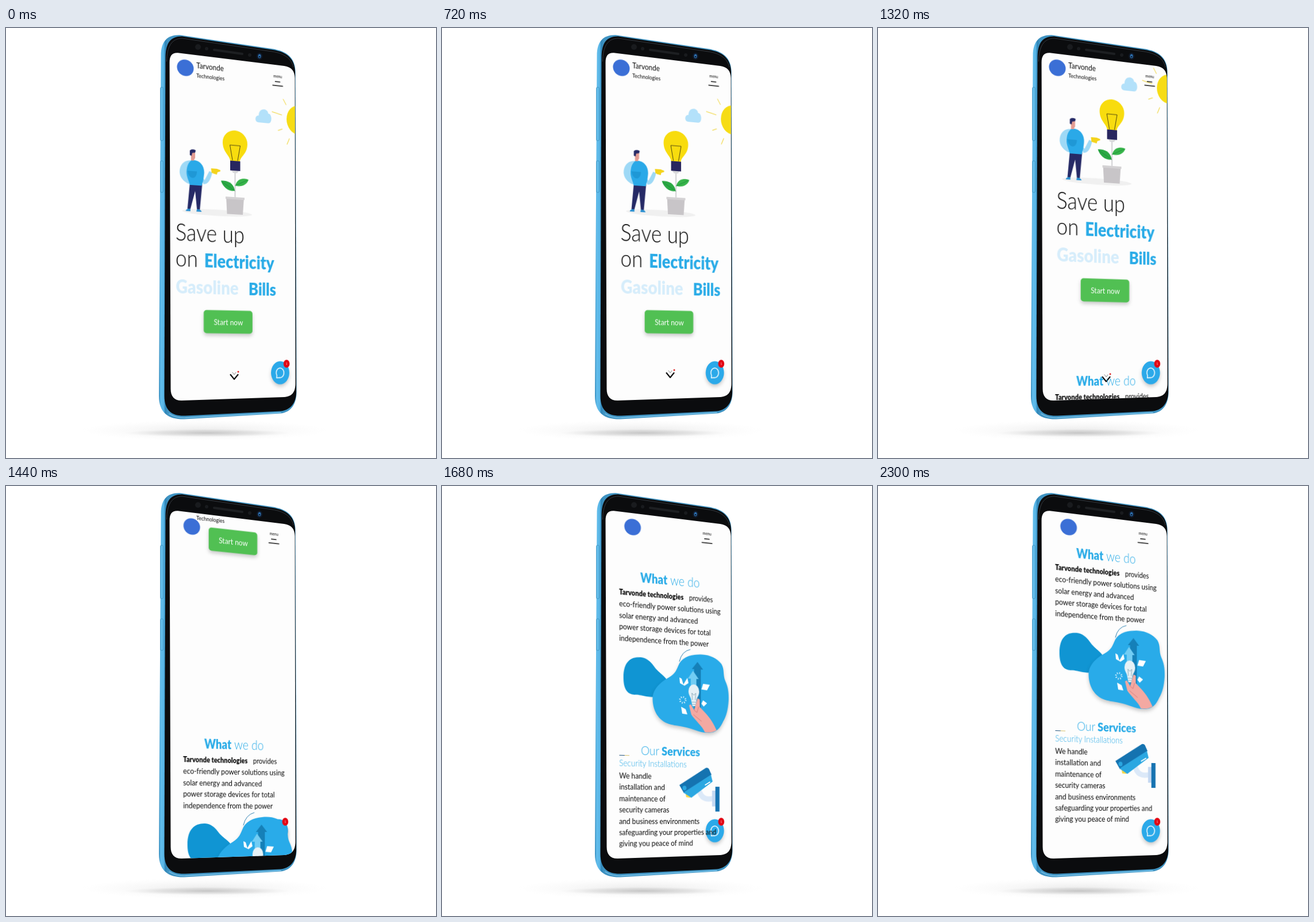
These frames come from a looping animation (748 by 748 pixels, 2340 ms). An HTML page:

```html
<!DOCTYPE html>
<html lang="en">
<head>
<meta charset="utf-8">
<title>Phone page scroll</title>
<style>
  html, body { margin: 0; width: 100%; height: 100%; overflow: hidden; background: #fff; }
  body { position: relative; contain: paint; }
  svg, .screen { position: absolute; left: 0; top: 0; width: 100%; height: 100%; display: block; overflow: hidden; }
  .screen {
    background: #fdfdfd;
    contain: paint;
    clip-path: path("M284.5 60 C284.5 47 290 42 301 43.5 L484 66 C497 68 502 75 502.5 87 L503.5 618 C503.5 634 497 641 484 642 L306 648 C293 648.5 286.5 641 286.5 628 Z");
  }
  /* Perspective: lines flatten out towards y = 585 */
  .screen .plane {
    overflow: visible;
    transform-origin: 395px 585px;
    transform: matrix3d(1,0,0,.00022, 0,1,0,0, 0,0,1,0, 0,0,0,1);
  }
  text { font-family: Lato, "Open Sans", sans-serif; fill: #0a0a0a; }
  .light { font-weight: 300; }
  .bold { font-weight: 900; }
  .blue { fill: #29abe7; }
  .pale { fill: #d6edfb; }
  .white { fill: #fff; }
  .lift { filter: drop-shadow(0 4px 3px rgba(0,0,0,.2)); }
  .line { fill: none; stroke-linecap: round; stroke-linejoin: round; }
</style>
</head>
<body>
<svg viewBox="0 0 748 748">
  <defs>
    <linearGradient id="side" x1="266" x2="281" y1="0" y2="0" gradientUnits="userSpaceOnUse">
      <stop offset="0" stop-color="#2f86b8"/><stop offset=".2" stop-color="#62bdec"/>
      <stop offset=".55" stop-color="#5ab6e6"/><stop offset=".75" stop-color="#2f84b6"/><stop offset="1" stop-color="#3f93c2"/>
    </linearGradient>
    <radialGradient id="core">
      <stop offset="0" stop-color="#777" stop-opacity=".36"/><stop offset=".6" stop-color="#999" stop-opacity=".2"/>
      <stop offset="1" stop-color="#bbb" stop-opacity="0"/>
    </radialGradient>
    <radialGradient id="soft">
      <stop offset="0" stop-color="#bbb" stop-opacity=".3"/><stop offset="1" stop-color="#ddd" stop-opacity="0"/>
    </radialGradient>
  </defs>
  <ellipse cx="345" cy="700" rx="215" ry="18" fill="url(#soft)"/>
  <ellipse cx="350" cy="704.500" rx="145" ry="7" fill="url(#core)"/>
  <path d="M269.500 48 C269.500 22 282 11 304 12.500 L462 36 C489 40 503 52 503.500 76 L505.500 632 C505.500 653 497 668 478 670.500 L310 680.500 C284 681 266 671 266 640 Z" fill="url(#side)"/>
  <path d="M277.500 50 C278 26 286 14.500 306 14.500 L464 38 C490 42 502 54 503 77 L505 632 C505 650 497 664 478 666.500 L312 674.500 C289 675.500 275.500 666 275.500 640 Z" fill="#0b0c0e"/>
  <path class="line" d="M279.500 58 C280 32 288 18 307 18 L463 41 C483 44 496 52 500 68" stroke="#34383d" stroke-width="1"/>
  <path class="line" d="M284 671 Q295 678.500 312 678 L478 669" stroke="#7cc4ea" stroke-width="1.300"/>
  <g fill="#62bce9" stroke="#3a8ebd" stroke-width=".8">
    <rect x="268.500" y="103" width="5" height="93" rx="2"/>
    <rect x="268.500" y="231" width="5" height="55" rx="2"/>
  </g>
  <path class="line" d="M362 38 L411 45" stroke="#1d1f22" stroke-width="4"/>
  <g fill="#191b1e"><circle cx="334" cy="33" r="5"/><circle cx="349" cy="36" r="3"/><circle cx="424" cy="47" r="3"/></g>
  <ellipse cx="441" cy="49" rx="5" ry="6" fill="#101a2a"/>
  <ellipse cx="441" cy="49" rx="2.500" ry="3.500" fill="#2c6fae"/>
  <circle cx="441" cy="50" r="1.200" fill="#0a1220"/>
</svg>

<div class="screen">
<svg class="plane" viewBox="0 0 748 748">
  <g id="chat">
    <ellipse class="lift" cx="478.500" cy="600" rx="16.500" ry="20.500" fill="#2ba9e9"/>
    <path class="line" d="M472 609 L472.500 605 A7 8.500 0 1 1 477 608.500 Z" stroke="#fff" stroke-width="1.500"/>
  </g>

  <g id="hero">
    <g id="sun">
      <ellipse cx="512" cy="149.500" rx="22" ry="26" fill="#f6dc15"/>
      <path class="line" d="M484 115 L489 124 M464 139 L481 143 M475 171 L482 168 M491 194 L495 184" stroke="#f3df6c" stroke-width="1.500"/>
    </g>
    <path id="cloud" d="M440 160 C432 160 433 148 440 148 C440 134 456 133 457 143 C464 142 465 160 457 160 Z" fill="#b3e1fa"/>
    <g id="man">
      <ellipse cx="368" cy="323" rx="60" ry="5.500" fill="#f0f0f0"/>
      <g transform="translate(1 5)">
        <path d="M320 270 L341 270 L337 314 L332 314 L329 283 L321 314 L316 314 Z" fill="#262a66"/>
        <path d="M313 318 Q315 313 321 314 L321 318 Z M331 318 L332 314 Q338 313 340 318 Z" fill="#2b8fd0"/>
        <path d="M322 231 C308 231 302 243 303 254 C304 264 314 271 321 272 L332 240 Z" fill="#9ed9f6"/>
        <path d="M339 256 L345 263 L353 247 L358 249 C356 260 351 271 343 270 Z" fill="#9ed9f6"/>
        <path d="M325 230 C338 229 346 240 344 254 C343 264 341 271 340 273 L320 273 C317 262 313 257 315 246 C316 238 320 231 325 230 Z" fill="#2aa9e8"/>
        <path d="M316 249 C318 265 332 264 332 249" fill="#1f98d6"/>
        <path d="M322 217 L329 217 L329 226 Q327 229 327 231 L322 231 Z" fill="#e39c92"/>
        <path d="M320 222 L320 214 Q324 210 330 213 L329 217 L324 218 L323 223 Z" fill="#262a66"/>
        <path d="M356 242 L366 242 L372 244 L372 246 L367 248 L366 252 L357 250 Z" fill="#f4d31c"/>
      </g>
    </g>
    <g id="plant">
      <path d="M383 294 L414 294 L412 324 L384.500 324 Z" fill="#c8c5c8"/>
      <path d="M382 294 H415 V298 H382 Z" fill="#d4d2d4"/>
      <path class="line" d="M398.500 250 V293" stroke="#d8d8da" stroke-width="2.500"/>
      <path d="M398 283 C389 285 378 280 374 267 C388 265 397 272 398 283 Z" fill="#2ba944"/>
      <path d="M399 274 C401 263 411 258 422 262 C419 272 409 276 399 274 Z" fill="#37b44a"/>
      <path class="line" d="M376 269 L398 283 M399 274 L420 263" stroke="#188a36" stroke-width=".8"/>
      <path d="M390 231 C389 222 377 217 377 200 A21.500 22 0 0 1 420 200 C420 217 408 222 407 231 Z" fill="#f8dc0e"/>
      <path class="line" d="M394 230 L389.500 204 H407.500 L403 230" stroke="#51470f" stroke-width="1"/>
      <path d="M390 231 H407.500 V248 H390 Z" fill="#28265f"/>
      <path d="M392 248 H405 L402 252 H395 Z" fill="#d8d8da"/>
    </g>
    <g id="button">
      <rect class="lift" x="344.500" y="491.500" width="84.500" height="40" rx="5" fill="#51c053"/>
    </g>
    <g id="title"></g>
  </g>

  <g id="chevron">
    <path class="line" d="M390.500 603 L397 611 L403.500 603" stroke="#111" stroke-width="2.200"/>
    <path class="line" d="M394 599 L397 603 L400 599" stroke="#888" stroke-width="1"/>
    <circle cx="404" cy="598" r="1.500" fill="#d22"/>
  </g>

  <g id="page">
    <path d="M317 295 C317 270 328 259 346 259 C362 260 367 272 374 279 C383 288 394 293 393 303 C391 315 380 326 366 326.500 C352 327 345 323 336 324 C322 324 317 313 317 295Z" fill="#1095d3"/>
    <path class="line" d="M413 262 Q417 244 432 240" stroke="#2b7fb0" stroke-width="1"/>
    <path class="lift" d="M366.500 330 C366 315 378 302 390 294 C404 286 407 280 411 270 C416 256 430 249 446 248 C462 246 478 250 488 262 C494 272 490 280 495 292 C500 302 501.500 312 501 326 C500 342 497 354 491 364 C486 376 478 385 464 385 C450 386 436 378 420 376 C408 374 400 374 392 371 C378 366 367 352 366.500 330Z" fill="#29abe9"/>
    <path d="M445 261 L455 274 H451 V350 H439 V274 H435 Z" fill="#1580b8"/>
    <path d="M437 277 L447 291 H443 V315 H433 V291 H428 Z" fill="#72cdf4"/>
    <path d="M413 290 L417 292 L420 302 L427 290 L429 299 L422 304 L414 300 Z M455 299 L467 300 L462 310 L452 309 Z M416 341 L424 345 L427 354 L418 353 Z M455 328 L462 333 L456 339 L452 334 Z" fill="#fff"/>
    <circle class="line" cx="419" cy="329" r="5" stroke="#d9f1fd" stroke-width="3" stroke-dasharray="1.500 2.430" style="stroke-linecap:butt"/>
    <path d="M430 338 L433 336 L439 346 L445 325 L449 327 L449 340 L459 350 C467 358 475 370 479 380 Q469 386 458 384 C454 374 440 363 434 354 Z" fill="#f3a9a2"/>
    <path class="line" d="M439 346 L444 350 L447 340 M438 354 L452 365" stroke="#d77e7d" stroke-width="1"/>
    <path d="M434 330 C434 324 429 321 429 313 A9.500 12 0 0 1 448 313 C448 321 443 324 443 330 L441 339 H436 Z" fill="#e6f1f6"/>
    <path class="line" d="M436 328 L435 316 L438.500 320 L442 316 L441 328 M435 332 H442 M436 336 H441" stroke="#8ca9b8" stroke-width="1"/>

    <path d="M310 428.500 H319" stroke="#25557c"/><path d="M319 428.500 H327" stroke="#d9c169"/>
    <path class="line" d="M449 490 Q454 505 472 501" stroke="#dce9f8" stroke-width="9"/>
    <path d="M471 487 H478 V515 H471 Z" fill="#c5d9f2"/>
    <path d="M477 480 H484.500 V524 H477 Z" fill="#1673b1"/>
    <path d="M423 488 L434 494 L432 500 L425 499 Z" fill="#f9d84a"/>
    <path d="M413 478 L460 447 Q464 446 466 450 L470 459 L421 492 Z" fill="#1573b0"/>
    <path d="M420 491 L469 459 L472 471 L434 500 L428 496 Z" fill="#2ba7e1"/>
    <ellipse cx="422" cy="483" rx="3.500" ry="4" fill="#2ba7e1"/>
    <path class="line" d="M459 477 L467 472" stroke="#fff" stroke-width="2"/>
  </g>

  <g id="name"></g>
  <circle id="logo" cx="313.500" cy="78.500" r="14" fill="#3b6fd6"/>
  <g id="menu">
    <path d="M469 85 H478.500 M464.500 92 H483.500" stroke="#111" stroke-width="1.700"/>
  </g>
  <g id="badge">
    <ellipse cx="490" cy="584" rx="5.500" ry="7" fill="#e30613"/>
  </g>
</svg>
</div>

<script>
const LOOP = 2340;
const STEP = 20;        // each picture holds this long
const SQUEEZE = 0.85;   // foreshortening of the turned screen
const el = id => document.getElementById(id);

function put(id, x, y, size, cls, str, anchor = 'start') {
  const t = document.createElementNS('http://www.w3.org/2000/svg', 'text');
  t.setAttribute('transform', `translate(${x} ${y}) scale(${SQUEEZE} 1)`);
  t.setAttribute('font-size', size);
  t.setAttribute('class', cls);
  t.setAttribute('text-anchor', anchor);
  t.textContent = str;
  el(id).append(t);
}

put('name', 332, 77.2, 13.6, '', 'Tarvonde');
put('name', 332, 92.5, 10, '', 'Technologies');
put('menu', 474, 77.5, 7.4, '', 'menu', 'middle');
put('badge', 490, 586, 5, 'white', '1', 'middle');

put('title', 297, 374, 41, 'light', 'Save up');
put('title', 297, 418, 40, 'light', 'on');
put('title', 345.5, 418.3, 31.5, 'bold blue', 'Electricity');
put('title', 297.5, 463.5, 32.3, 'bold pale', 'Gasoline');
put('title', 422, 463.5, 30.5, 'bold blue', 'Bills');
put('button', 387, 516.5, 14, '', 'Start now', 'middle');
el('button').lastChild.classList.add('white');

put('page', 345.5, 129.5, 21.8, 'bold blue', 'What');
put('page', 397, 129.5, 23, 'light blue', 'we do');
put('page', 309.7, 154.4, 12.8, 'bold', 'Tarvonde technologies');
put('page', 430, 154.4, 13.4, '', 'provides');
['eco-friendly power solutions using', 'solar energy and advanced',
 'power storage devices for total', 'independence from the power']
  .forEach((s, i) => put('page', 309.7, 174 + 19.6 * i, 13.8, '', s));
put('page', 346.5, 427, 22, 'light blue', 'Our');
put('page', 382, 427, 21.2, 'bold blue', 'Services');
put('page', 309.7, 447, 15.5, 'light blue', 'Security Installations');
['We handle', 'installation and', 'maintenance of', 'security cameras',
 'and business environments', 'safeguarding your properties and', 'giving you peace of mind']
  .forEach((s, i) => put('page', 309.7, 468 + 19.4 * i, 13.8, '', s));

// Smooth monotone curve through [time, value] points
function track(...pts) {
  const rate = i => (pts[i + 1][1] - pts[i][1]) / (pts[i + 1][0] - pts[i][0]);
  const slope = pts.map((_, i) => {
    if (!i || i === pts.length - 1) return 0;
    const a = rate(i - 1), b = rate(i);
    return a * b > 0 ? 2 * a * b / (a + b) : 0;
  });
  return t => {
    if (t <= pts[0][0]) return pts[0][1];
    const i = pts.findIndex(p => p[0] > t) - 1;
    if (i < 0) return pts[pts.length - 1][1];
    const [t0, v0] = pts[i], [t1, v1] = pts[i + 1];
    const d = t1 - t0, u = (t - t0) / d, w = 1 - u;
    return v0 * w * w * (1 + 2 * u) + v1 * u * u * (3 - 2 * u)
      + d * u * w * (slope[i] * w - slope[i + 1] * u);
  };
}

const inset = track([430, 0], [700, 1]);
const heroUp = track([1140, 0], [1320, 55], [1440, 415], [1510, 660]);
const pageUp = track([1140, 0], [1320, 55], [1440, 219], [1560, 385], [1680, 505], [1900, 539], [2220, 547]);
const nameUp = track([1320, 0], [1440, 27], [1540, 75]);
const header = track([1330, 0], [1440, 0.57], [1560, 1]);
const bob = track([440, 0], [720, -3], [1320, 4]);
const fade = track([1330, 1], [1420, 0]);

const move = (id, x, y = 0) => el(id).setAttribute('transform', `translate(${x} ${y})`);
const shifts = { title: 15, man: 13.5, plant: 8.5, button: 8.5, cloud: -11, sun: -3, chat: -2.4, badge: -2.4 };

function draw(t) {
  const k = inset(t), h = header(t);
  for (const id in shifts) move(id, shifts[id] * k);
  move('hero', 0, -heroUp(t));
  move('page', 0, 547 - pageUp(t));
  move('name', 0, -nameUp(t));
  move('logo', 19 * h);
  move('menu', -12 * h);
  move('chevron', 0, bob(t));
  el('chevron').setAttribute('opacity', fade(t));
}

const start = performance.now();
function tick() {
  const t = (performance.now() - start) % LOOP;
  draw(Math.floor((t + 1) / STEP) * STEP);
  requestAnimationFrame(tick);
}
tick();
</script>
</body>
</html>
```
